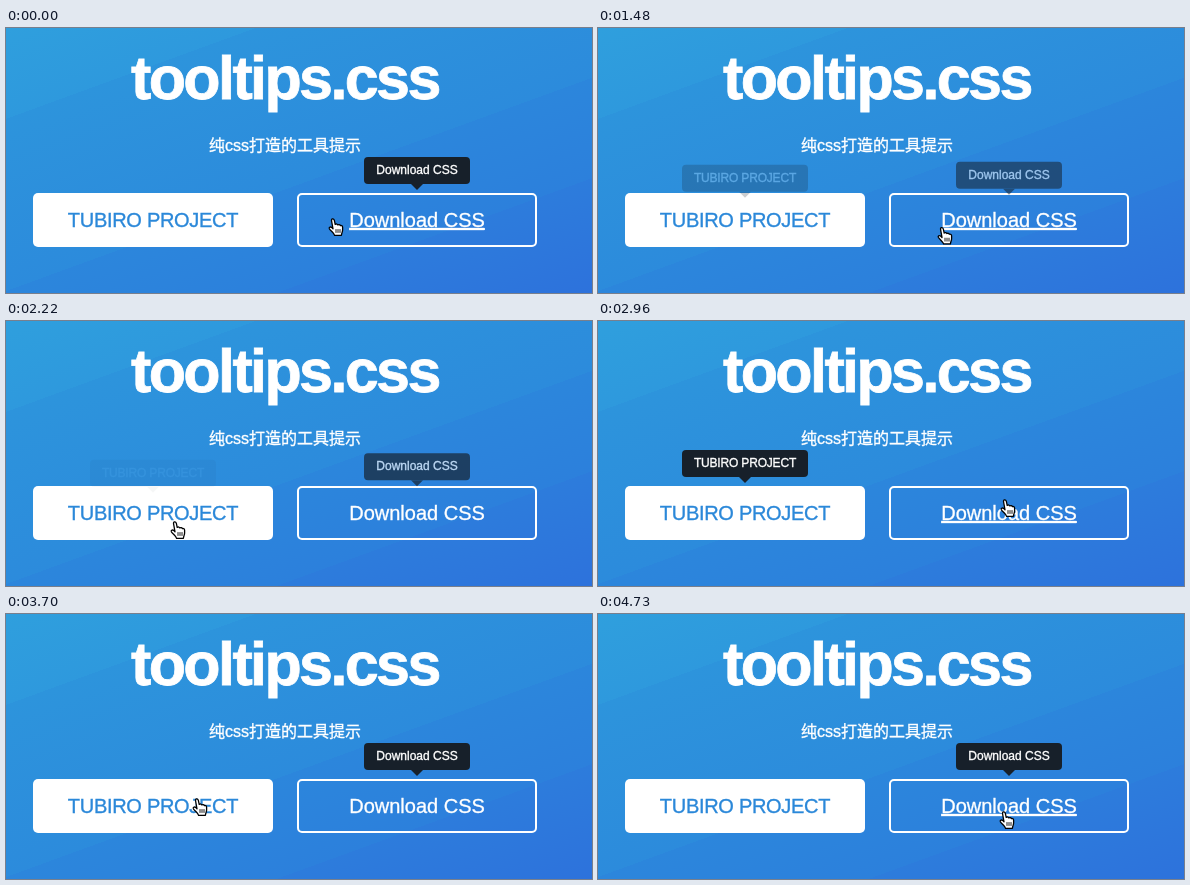
Write an HTML page that moves like this. It is 586x265 px and loops after 4.88 s.

```html
<!DOCTYPE html>
<html lang="zh">
<head>
<meta charset="utf-8">
<title>tooltips.css</title>
<style>
html, body { margin: 0; height: 100%; overflow: hidden; }
body {
  background: linear-gradient(160deg,
    #2f9fdd 0, #2e99dd 19%, #2d94dc 19%, #2c8bdc 55%,
    #2c86dc 55%, #2c80dc 76%, #2d7cdc 76%, #2d72dc 100%);
}
svg { display: block; width: 586px; height: 265px; }
text {
  font-family: "Liberation Sans", Arial, "Noto Sans CJK SC", "Noto Sans CJK", sans-serif;
  color: #fff; fill: currentColor; stroke: currentColor; stroke-width: .35px;
}
.title { font-size: 61px; font-weight: bold; letter-spacing: -2.6px; stroke-width: .8px; }
.sub { font-size: 16px; }
.label { font-size: 20px; text-anchor: middle; }
.blue { color: #2b88d9; }
.tip { fill: #17202a; }
.tip text { font-size: 12px; text-anchor: middle; }
.caps { letter-spacing: -.0147em; }
</style>
</head>
<body>
<svg viewBox="0 0 586 265">
  <text class="title" x="125" y="70.5">tooltips.css</text>
  <text class="sub" x="203" y="123">纯css打造的工具提示</text>

  <rect x="27" y="165" width="240" height="54" rx="5" fill="#fff"/>
  <text class="label caps blue" x="147" y="199">TUBIRO PROJECT</text>
  <rect x="292" y="166" width="238" height="52" rx="4" fill="none" stroke="#fff" stroke-width="2"/>
  <text class="label" id="link" x="411" y="199">Download CSS</text>

  <g class="tip" id="left">
    <rect x="84" y="129" width="126" height="27" rx="4"/>
    <path d="M141 156h12l-6 6z"/>
    <text class="caps" x="147" y="146">TUBIRO PROJECT</text>
  </g>
  <g class="tip" id="right">
    <rect x="358" y="129" width="106" height="27" rx="4"/>
    <path d="M405 156h12l-6 6z"/>
    <text x="411" y="146">Download CSS</text>
  </g>

  <g id="hand" stroke="#000" stroke-linejoin="round" stroke-linecap="round">
    <path fill="#fff" stroke-width="1.3" d="M3.6 3C3 .6 5.6 .2 6.3 2.2L7.2 6.4C8.3 5.6 9.4 6 9.8 6.9C10.9 6.3 12 6.7 12.3 7.6C13.6 7.2 14.6 8 14.6 9.2V12C14.6 14 13.6 15 13.4 17.3H6.6C6.4 15.6 3.4 13.4 1.4 10.8C.6 9.4 2.2 8.4 3.6 9.4L5 10.8Z"/>
    <path fill="none" stroke-width=".9" d="M8 11.5v3M10 11.5v3M12 11.5v3"/>
  </g>
</svg>
<script>
const LOOP = 4880, TICKS = 33;
const DELAY = 1.6, FADE = 1.4, SAMPLES = 28; // delay and fade in ticks
const $ = id => document.getElementById(id);

// Turning points of the pointer: tick, x, y
const stops = [
  [0, 330, 199], [2, 190, 183], [6, 190, 183], [8.6, 347, 206], [12, 347, 210],
  [15, 172, 209], [18, 170, 210], [20, 410, 187], [22.7, 410, 187],
  [25, 194, 193], [26.5, 190, 196], [31, 409, 206], [32, 409, 206], [33, 330, 199]
];

function pointer(tick) {
  const k = (tick + TICKS) % TICKS;
  const i = stops.findIndex(s => s[0] > k);
  const [t0, x0, y0] = stops[i - 1], [t1, x1, y1] = stops[i];
  const u = (k - t0) / (t1 - t0);
  return [x0 + (x1 - x0) * u, y0 + (y1 - y0) * u];
}

const overLeft = x => x < 267;
const overRight = x => x > 291;

// A delayed linear fade equals the share of a past time window spent hovering.
function showTip(id, over, tick) {
  let hits = 0;
  for (let i = 0; i < SAMPLES; i++) {
    const past = DELAY + FADE * (i + .5) / SAMPLES;
    if (over(pointer(tick - past)[0])) hits++;
  }
  const shown = hits / SAMPLES;
  $(id).setAttribute("opacity", shown);
  $(id).setAttribute("transform", `translate(0 ${10 * (1 - shown)})`);
}

function draw(now) {
  const tick = Math.floor((now % LOOP) / LOOP * TICKS + .05) % TICKS;
  const [x, y] = pointer(tick);
  $("hand").setAttribute("transform", `translate(${x - 8} ${y - 9})`);
  $("link").setAttribute("text-decoration", overRight(x) ? "underline" : "none");
  showTip("left", overLeft, tick);
  showTip("right", overRight, tick);
}

const start = performance.now();
function loop() {
  draw(performance.now() - start);
  requestAnimationFrame(loop);
}
loop();
</script>
</body>
</html>
```
